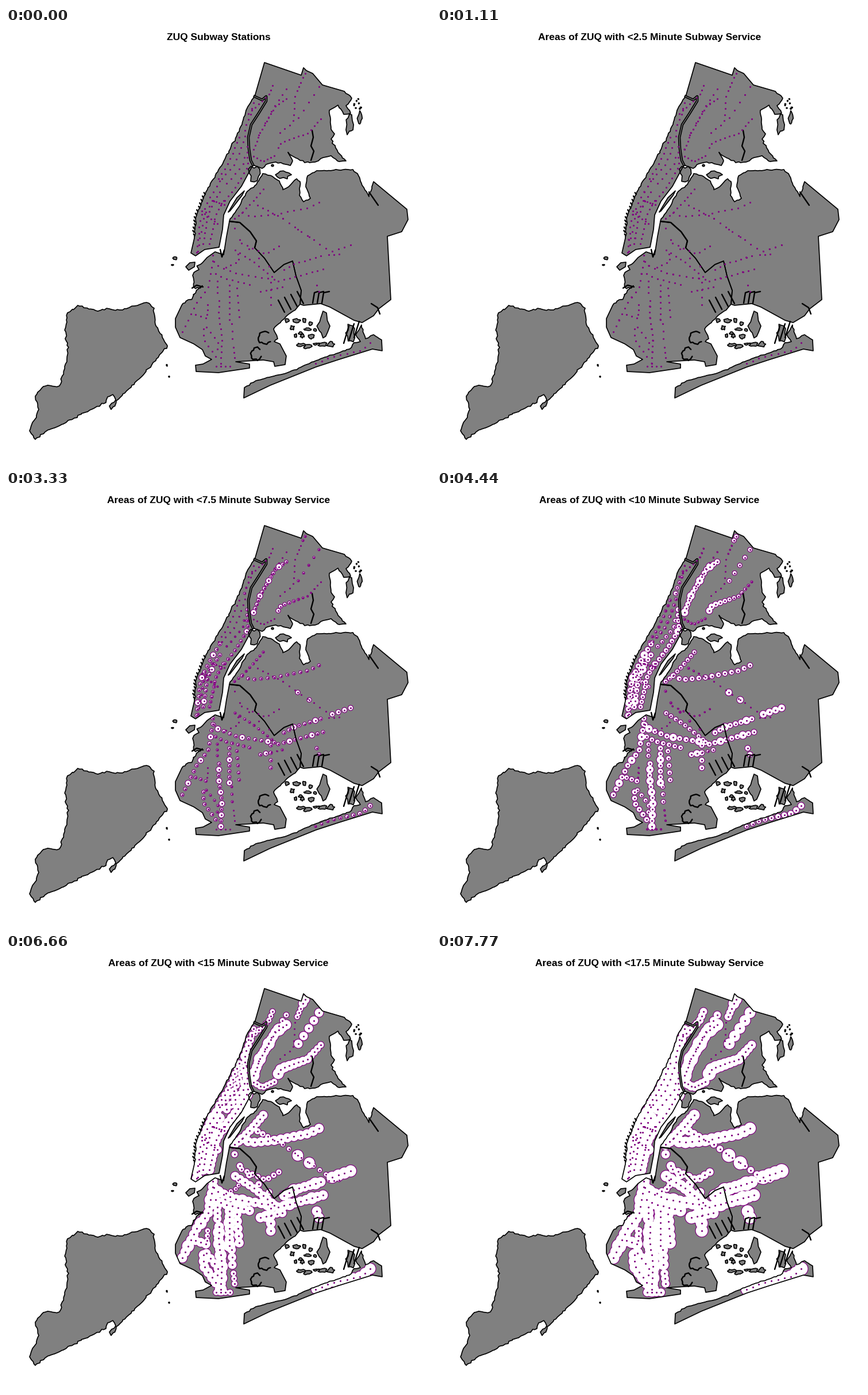
Animation, 740 px wide and 756 px high, one loop 8 s. Source, as a matplotlib script:

```python
import numpy as np
import matplotlib.pyplot as plt
from matplotlib.animation import FuncAnimation
from matplotlib.collections import PolyCollection, LineCollection
from matplotlib.path import Path

W, H, DPI = 740, 756, 100
PX = 72 / DPI
INTERVAL, FRAMES, HOLD = 50, 160, 1110
GRAY, PURPLE = "#808080", "#800080"
GROWTH = 0.8  # pixels of walking radius per minute

rng = np.random.default_rng(4)


def pts(*v):
    return np.array(v, float).reshape(-1, 2)


def along(p, n):
    """n evenly spaced points on a polyline."""
    d = np.r_[0, np.cumsum(np.hypot(*np.diff(p, axis=0).T))]
    s = np.linspace(0, d[-1], n)
    return np.column_stack([np.interp(s, d, p[:, i]) for i in (0, 1)])


def shore(amp, *v):
    """Ragged coastline through a few key points."""
    p = pts(*v)
    out = [p[:1]]
    for a, b in zip(p, p[1:]):
        n = max(2, int(np.hypot(*(b - a)) / 4))
        seg = along(np.array([a, b]), n + 1)[1:]
        seg[:-1] += rng.normal(0, amp, (n - 1, 2))
        out.append(seg)
    return np.vstack(out)


def blob(x, y, rx, ry):
    a = np.linspace(0, 2 * np.pi, 12, endpoint=False)
    k = rng.uniform(0.6, 1.2, 12)
    return np.column_stack([x + rx * k * np.cos(a), y + ry * k * np.sin(a)])


# ---- land ----
harlem = pts(433, 119, 446, 125, 453, 119, 453, 127, 440, 148, 427, 168,
             422, 190, 423, 210, 426, 230, 430, 238)
east = pts(410, 275, 390, 301, 379, 325, 377, 350, 371, 381)
west = shore(0.7, 328, 365, 332, 325, 348, 285, 381, 228, 406, 180,
             418, 143, 428, 125)
manhattan = np.vstack([harlem, east, pts(346, 385, 330, 396, 322, 391), west])

bronx = np.vstack([
    harlem[::-1], pts(450, 60, 514, 82, 518, 69, 523, 74, 534, 79, 551, 99),
    shore(0.7, 589, 110, 602, 122, 592, 135, 600, 148, 588, 150, 578, 134,
          563, 143, 566, 176, 572, 184, 566, 193, 578, 216, 592, 231, 577, 231,
          566, 222, 548, 227, 538, 233, 520, 234, 505, 226, 491, 216, 499, 231,
          495, 239, 470, 233, 456, 236, 446, 244)])

border = pts(389, 336, 407, 338, 425, 354, 436, 370, 433, 382, 450, 400,
             467, 425, 484, 411, 499, 405, 505, 431, 514, 456, 512, 480)
queens = np.vstack([
    shore(0.6, 390, 332, 404, 313, 411, 298, 420, 284, 436, 272, 447, 253,
          464, 258, 476, 266, 482, 281, 492, 276, 506, 262, 512, 267, 511, 291,
          518, 302, 530, 296, 522, 276, 525, 257, 541, 248, 604, 246, 612, 253,
          619, 270, 632, 293, 640, 267),
    pts(698, 315, 700, 333, 689, 354, 664, 362, 670, 472, 649, 488, 640, 500,
        620, 512, 606, 508, 564, 485, 548, 479, 518, 482),
    border[::-1]])
brooklyn = np.vstack([
    pts(384, 362, 379, 394, 364, 389, 350, 399),
    shore(1.6, 342, 408, 325, 430, 330, 453, 342, 448, 304, 486),
    pts(295, 505, 295, 520, 303, 538, 327, 549, 342, 559, 347, 570, 358, 576,
        343, 584, 330, 586, 331, 597, 370, 599, 424, 591, 424, 584, 400, 580,
        448, 577, 466, 580, 468, 588, 486, 585, 488, 570),
    shore(0.6, 477, 549, 467, 545, 473, 540, 466, 523, 489, 500, 506, 487),
    border[::-1]])
rockaway = np.vstack([
    shore(0.5, 415, 625, 435, 613, 490, 599, 540, 578, 598, 558, 606, 547,
          617, 545, 609, 533, 619, 516, 626, 540, 640, 533, 654, 542),
    pts(655, 561, 638, 558, 580, 576, 540, 589, 460, 621, 414, 643)])
staten = shore(0.9, 125, 482, 107, 495, 103, 540, 109, 555, 106, 580, 93, 622,
               65, 623, 51, 640, 57, 663, 41, 700, 51, 715, 68, 702, 97, 689,
               138, 668, 174, 651, 177, 641, 186, 637, 191, 646, 180, 657,
               183, 663, 196, 645, 235, 607, 281, 553, 260, 515, 258, 487,
               245, 477, 203, 490, 180, 488, 156, 491, 125, 482)

land = [manhattan, bronx, queens, brooklyn, rockaway, staten]
land += [pts(415, 283, 411, 291, 390, 318, 387, 320, 402, 295),
         pts(313, 415, 320, 408, 329, 407, 328, 415, 318, 421)]
for b in [(432, 253, 10, 13), (483, 255, 13, 8), (598, 168, 7, 18),
          (616, 157, 4, 12), (294, 400, 4, 3), (290, 412, 2, 1),
          (280, 586, 1, 2), (284, 606, 1, 1), (464, 239, 2, 2),
          (552, 518, 10, 22), (600, 530, 8, 15)]:
    land.append(blob(*b))
# marsh islands of the bay, islets in the sound
for row in range(4):
    for col in range(5):
        x, y = 491 + 14 * col + 7 * row, 508 + 14 * row + 2 * (col % 2)
        if abs(x - 552) > 9 or y > 540:
            land.append(blob(x + rng.normal(0, 2), y + rng.normal(0, 2),
                             rng.uniform(2, 8), rng.uniform(2, 5)))
for _ in range(9):
    land.append(blob(rng.uniform(606, 620), rng.uniform(120, 142), 1, 1))

# ---- narrow inlets ----
creeks = [border[:5], pts(533, 178, 535, 190, 531, 205, 536, 214, 531, 230),
          pts(632, 285, 648, 308), pts(636, 479, 647, 486, 651, 497),
          pts(343, 450, 332, 447, 324, 452), pts(373, 385, 376, 398, 380, 386)]
creeks += [pts(474 + 11 * i, 473 - 5 * i, 485 + 11 * i, 494 - 5 * i)
           for i in range(4)]
creeks += [pts(534 + 8 * i, 478, 537 + 8 * i, 460, 543 + 10 * i, 458)
           for i in range(3)]
creeks += [pts(588 + 9 * i, 548 - 5 * i, 597 + 9 * i, 518 - 4 * i)
           for i in range(3)]
for cx, cy in [(450, 538), (436, 566)]:
    a = np.linspace(0.5, 5.5, 14)
    creeks.append(np.column_stack([cx + 10 * np.cos(a), cy + 11 * np.sin(a)])
                  + rng.normal(0, 1, (14, 2)))
for y in range(286, 360, 6):
    x = np.interp(y, west[::-1, 1], west[::-1, 0])
    creeks.append(pts(x - 3, y, x - 1, y + 3))

# ---- stations: x, y, radius at ten minutes ----
stations = []


def run(n, r, *v, hub=0):
    """n stops on a route; r is one radius or (first, last); hubs are busier."""
    radii = np.linspace(*np.broadcast_to(r, 2), n)
    for i, (x, y) in enumerate(along(pts(*v), n)):
        bonus = 2 if hub and i % hub == hub // 2 else 0
        stations.append((x, y, radii[i] + bonus))


def lane(n, r, y0, y1, u0, u1, hub=0):
    """A route down the long island, u of the way from west to east shore."""
    edge = np.vstack([harlem[4:], east])
    y = np.linspace(y0, y1, 12)
    left = np.interp(y, west[::-1, 1][::-1], west[::-1, 0][::-1]) \
        if west[0, 1] < west[-1, 1] else np.interp(y, *west[::-1].T[::-1])
    right = np.interp(y, edge[:, 1], edge[:, 0])
    x = left + (right - left) * np.linspace(u0, u1, 12)
    run(n, r, *np.column_stack([x, y]).ravel(), hub=hub)


# north
run(2, 4, 521, 79, 517, 86)
run(3, 1, 513, 95, 507, 109)
run(8, -9, 503, 119, 500, 164, 477, 182)
run(5, 4, 545, 102, 526, 131, 509, 156)
run(12, (2, 6), 548, 158, 525, 183, 479, 199, 474, 208)
run(7, 2, 467, 222, 446, 232, 431, 223)
run(15, 5, 488, 123, 470, 135, 443, 180, 431, 211, hub=4)
run(9, 1, 488, 106, 467, 136, 440, 186)
run(9, 1, 464, 100, 457, 117, 422, 149)
# long island
lane(6, (1, 4), 130, 178, 0.4, 0.5)
lane(9, 2.2, 190, 262, 0.25, 0.15)
lane(9, 2.5, 188, 262, 0.7, 0.25)
lane(12, 4.5, 206, 300, 0.9, 0.8, hub=8)
lane(6, 3.5, 225, 270, 0.75, 0.5)
lane(13, 5, 266, 390, 0.25, 0.1, hub=4)
lane(11, 5, 285, 375, 0.45, 0.35, hub=6)
lane(10, 4.5, 300, 375, 0.75, 0.6)
lane(9, 4, 300, 388, 0.35, 0.15)
lane(6, 3.5, 318, 340, 0.15, 0.8)
lane(5, 1.5, 300, 307, 0.4, 0.85)
# east
run(9, 4, 448, 280, 430, 301, 411, 321, 398, 331)
run(13, 4.7, 411, 321, 426, 328, 467, 324, 527, 312, 545, 303)
run(6, (2, -0.5), 438, 308, 482, 331)
run(8, 0.2, 482, 331, 508, 350, 537, 369, 557, 383)
run(2, 6, 508, 350, 528, 363)
run(4, 6.5, 568, 388, 600, 377)
run(3, -1, 562, 394, 580, 393)
run(8, 5, 484, 420, 502, 410, 548, 396, hub=4)
run(9, 5, 552, 419, 504, 432, 474, 440, hub=4)
run(2, 5, 541, 447, 545, 458)
run(9, 4, 399, 386, 429, 405, 463, 432)
run(8, 1.2, 410, 374, 452, 393, 475, 379)
run(5, 2, 398, 348, 402, 363, 435, 396, 458, 414)
run(5, 0, 404, 393, 405, 406, 383, 416)
# south
run(12, 5, 360, 395, 363, 411, 403, 427, 467, 437, hub=4)
run(7, 4.5, 365, 427, 380, 435, 424, 446)
run(5, (5, 2), 443, 458, 481, 450, hub=3)
run(4, 5, 461, 442, 461, 481)
run(13, 5, 360, 405, 352, 451, 332, 477, 307, 528, hub=4)
run(3, 4.5, 330, 498, 348, 504)
run(6, 5, 344, 523, 344, 542, 365, 571)
run(5, 4, 349, 520, 369, 545, 368, 558)
run(3, 1, 351, 481, 350, 498)
run(3, 4, 368, 440, 368, 460)
run(12, 5, 371, 474, 370, 497, 376, 540, 374, 583, hub=2)
run(7, 5, 389, 447, 389, 507, hub=4)
run(3, 4, 393, 514, 394, 540)
run(3, 1.5, 396, 555, 398, 573)
run(4, 1.5, 366, 588, 390, 588)
run(5, 4.5, 402, 452, 406, 502)
run(10, (4, 6), 539, 583, 565, 572, 619, 560, 634, 547)

xs, ys, base = np.array(stations).T

# ---- picture ----
fig = plt.figure(figsize=(W / DPI, H / DPI), dpi=DPI, facecolor="white")
ax = fig.add_axes([0, 0, 1, 1])
ax.set_xlim(0, W)
ax.set_ylim(H, 0)
ax.axis("off")

ax.add_collection(PolyCollection(land, facecolors=GRAY, edgecolors="none",
                                 zorder=1))
coast = Path.make_compound_path(
    *[Path(np.vstack([p, p[:1]]), closed=True) for p in land])


def discs(color, z):
    d = ax.scatter(xs, ys, s=np.zeros(len(xs)), c=color, linewidths=0, zorder=z)
    d.set_clip_path(coast, ax.transData)
    return d


def area(r):
    return (2 * np.clip(r, 0, None) * PX) ** 2


rims, areas = discs(PURPLE, 2), discs("white", 3)
ax.add_collection(PolyCollection(land, facecolors="none", edgecolors="black",
                                 linewidths=1.7 * PX, zorder=4))
ax.add_collection(LineCollection(creeks, colors="black", linewidths=2.4 * PX,
                                 capstyle="round", zorder=4))
for width, color in ((4.6, "black"), (1.2, GRAY)):
    ax.plot(*harlem.T, color=color, lw=width * PX, zorder=4.5)
ax.scatter(xs, ys, s=area(1.55), c=PURPLE, linewidths=0, zorder=5)
title = ax.text(370, 20.5, "", ha="center", va="baseline", fontsize=12.5,
                family="Liberation Sans", weight="bold")


def update(k):
    step = ((k + 1) * INTERVAL - 1) // HOLD
    minutes = 2.5 * step
    if step:
        title.set_text(f"Areas of ZUQ with <{minutes:g} Minute Subway Service")
    else:
        title.set_text("ZUQ Subway Stations")
    r = base + GROWTH * (minutes - 10)
    r = np.where((r > 0) & (step > 0), r, -1)
    rims.set_sizes(area(r + 0.6))
    areas.set_sizes(area(r - 0.6))
    return rims, areas, title


anim = FuncAnimation(fig, update, frames=FRAMES, interval=INTERVAL,
                     repeat=True, repeat_delay=0, blit=False)
plt.show()
```
